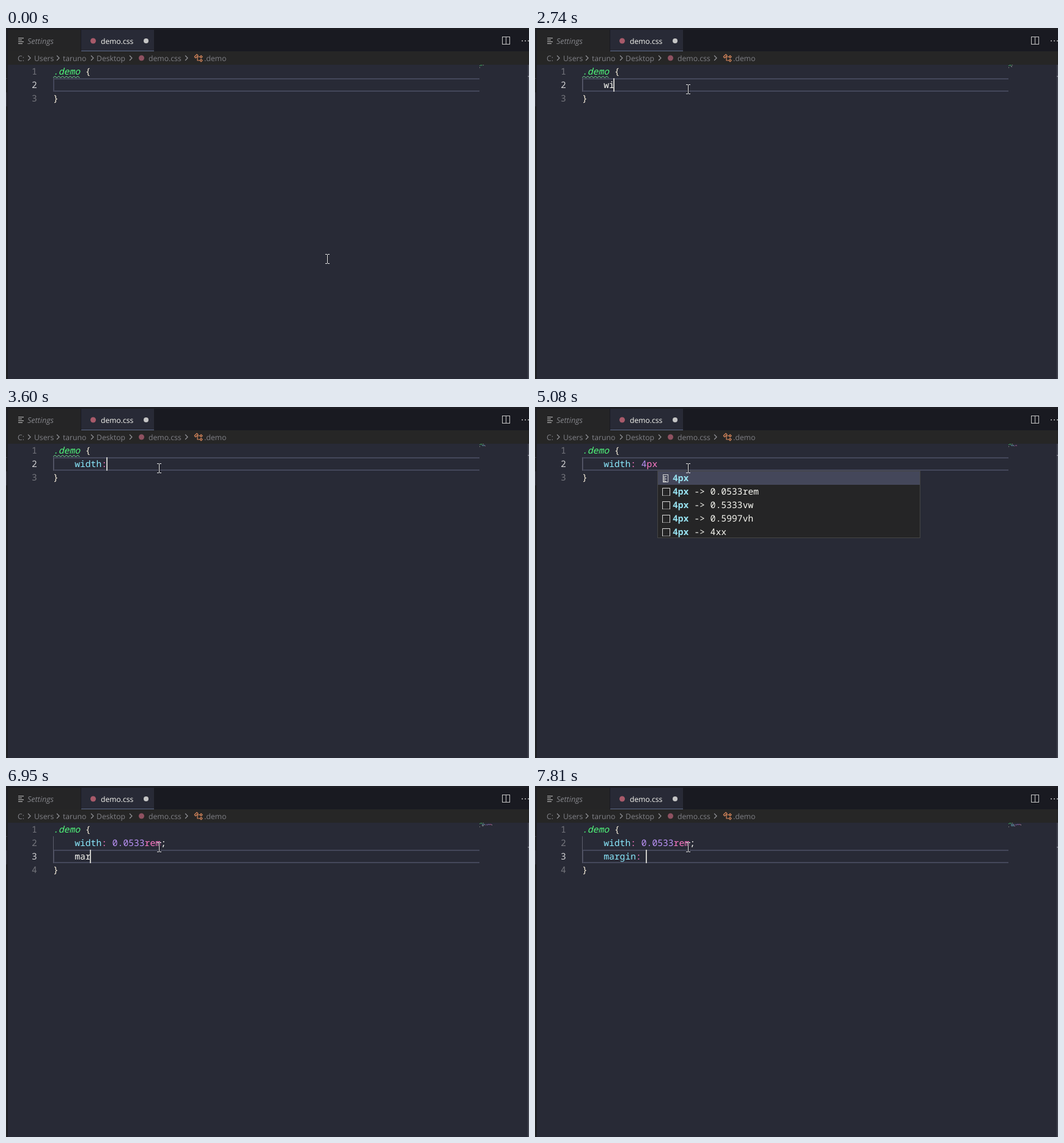
An HTML page with a canvas that plays this animation: 855 by 573 pixels, repeating every 8000 ms.

```html
<!DOCTYPE html>
<html lang="en">
<head>
<meta charset="utf-8">
<title>Editor demo</title>
<style>
html, body { margin: 0; width: 855px; height: 573px; overflow: hidden; background: #282a36; }
canvas { display: block; }
</style>
</head>
<body>
<canvas id="stage" width="855" height="573"></canvas>
<script>
const ctx = document.getElementById('stage').getContext('2d');
const LOOP = 8000, CELL = 8.8, LEFT = 77, ROW = 22;
const MONO = '"Noto Sans Mono", "DejaVu Sans Mono", monospace';
const UI = '"Open Sans", "Noto Sans", sans-serif';
const WHITE = '#f8f8f2', CYAN = '#8be9fd', PINK = '#ff79c6', PURPLE = '#bd93f9', BRACE = '#f8f0dc';

// Start time, line 2, line 3 (null = not there yet), popup, caret shown
const states = [
  [0, '', null, '', 0],
  [1650, '    ', null, '', 1],
  [2260, '    ', null, '', 0],
  [2570, '    w', null, '', 1],
  [2740, '    wi', null, '', 1],
  [2890, '    wid', null, 'width', 1],
  [3130, '    widt', null, 'width', 1],
  [3210, '    width', null, 'width', 1],
  [3600, '    width:', null, '', 1],
  [3690, '    width: ', null, '', 1],
  [3990, '    width: 4', null, '', 1],
  [4240, '    width: 4p', null, 'unit', 1],
  [4450, '    width: 4px', null, 'px', 1],
  [4930, '    width: 4px', null, 'px', 0],
  [5160, '    width: 4px', null, 'pxNext', 0],
  [5310, '    width: 0.0533rem', null, '', 1],
  [5860, '    width: 0.0533rem;', null, '', 1],
  [6240, '    width: 0.0533rem;', '    ', '', 1],
  [6710, '    width: 0.0533rem;', '    m', '', 1],
  [6880, '    width: 0.0533rem;', '    ma', '', 1],
  [6950, '    width: 0.0533rem;', '    mar', '', 1],
  [7030, '    width: 0.0533rem;', '    mar', 'marginList', 1],
  [7110, '    width: 0.0533rem;', '    mar', 'margin', 1],
  [7270, '    width: 0.0533rem;', '    marg', 'margin', 1],
  [7350, '    width: 0.0533rem;', '    margi', 'margin', 1],
  [7430, '    width: 0.0533rem;', '    margin', 'margin', 1],
  [7730, '    width: 0.0533rem;', '    margin:', 'margin', 1],
  [7810, '    width: 0.0533rem;', '    margin: ', '', 1]
];

const pointer = [
  [0, 525, 376], [70, 521, 372], [1110, 470, 305], [1190, 385, 212], [1270, 312, 144],
  [1340, 266, 108], [1420, 250, 99], [1650, 256, 102], [1720, 253, 101], [1800, 250, 99]
];

const marginItems = ['margin', ...['block', 'block-end', 'block-start', 'bottom', 'inline',
  'inline-end', 'inline-start', 'left', 'right', 'top'].map(s => 'margin-' + s), 'scroll-margin'];
const widthItems = ['width', ...['border', 'border-bottom', 'border-left', 'border-right', 'border-top',
  'column', 'column-rule', 'max', 'min', 'outline', 'stroke'].map(s => s + '-width')];
const pxItems = ['4px', '4px -> 0.0533rem', '4px -> 0.5333vw', '4px -> 0.5997vh', '4px -> 4xx'];
const marginDoc = ['Shorthand property to set values the', 'thickness of the margin area. If left is',
  'omitted, it is the same as right. If bottom is', 'omitted it is the same as top, if right is',
  'omitted it is the same as top. Negative', 'values for margin properties are allowed, but',
  'there may be implementation-specific limits.', '', 'Syntax: [ <length> | <percentage> | auto ]', '{1,4}'];
const widthDoc = ['Specifies the width of the content area,', 'padding area or border area (depending on',
  "'box-sizing') of certain boxes.", '', 'Syntax: <viewport-length>{1,2}'];

const popups = {
  width: { items: widthItems, doc: widthDoc, icon: wrench, w: 330 },
  marginList: { items: marginItems, icon: wrench, w: 330 },
  margin: { items: marginItems, doc: marginDoc, icon: wrench, w: 330 },
  unit: { items: ['4pc', '4pt', '4px', '4cap', '4dpi', '4dpcm', '4dppx'], icon: ruler, w: 430 },
  px: { items: pxItems, icon: pxIcon, w: 430 },
  pxNext: { items: pxItems, icon: pxIcon, w: 430, selected: 1 }
};

function at(list, t) {
  return list.findLast(entry => entry[0] <= t);
}

function box(x, y, w, h, color) {
  ctx.fillStyle = color;
  ctx.fillRect(x, y, w, h);
}

function frame(x, y, w, h, fill, border) {
  box(x, y, w, h, border);
  box(x + 1, y + 1, w - 2, h - 2, fill);
}

function line(color, width, ...paths) {
  ctx.strokeStyle = color;
  ctx.lineWidth = width;
  ctx.beginPath();
  for (const p of paths)
    for (let i = 0; i < p.length; i += 2) ctx[i ? 'lineTo' : 'moveTo'](p[i], p[i + 1]);
  ctx.stroke();
}

function dot(x, y, r, color) {
  ctx.fillStyle = color;
  ctx.beginPath();
  ctx.arc(x, y, r, 0, 7);
  ctx.fill();
}

function label(text, x, y, color, size = 12.2, style = '') {
  ctx.font = `${style} ${size}px ${UI}`;
  ctx.fillStyle = color;
  ctx.fillText(text, x, y);
}

// Monospaced text, one glyph per cell; colors holds one entry per character
function grid(text, x, y, colors, style = () => '') {
  [...text].forEach((ch, i) => {
    ctx.font = `${style(i)} 14.66px ${MONO}`;
    ctx.fillStyle = colors[i];
    ctx.fillText(ch, x + i * CELL, y);
  });
}

function colorsOf(text) {
  if (text[0] === '.') return [...text].map((c, i) => i < 5 ? '#50fa7b' : BRACE);
  if (text === '}') return [BRACE];
  const [, pad, name, colon, value] = text.match(/^(\s*)([a-z]*)(:?)(.*)$/);
  const known = /^(width|margin)$/.test(name) ? CYAN : WHITE;
  return [...pad].map(() => WHITE).concat(
    [...name].map(() => known), colon ? [PINK] : [],
    [...value].map(c => /[\d.]/.test(c) ? PURPLE : /[a-z]/.test(c) ? PINK : WHITE));
}

function wrench(x, y) {
  line('#c5c5c5', 1.1, [x + 8, y + 5, x + 2, y + 11, x + 1, y + 13, x + 3, y + 13, x + 9, y + 7],
    [x + 8, y + 5, x + 8, y + 2, x + 11, y, x + 10, y + 3, x + 12, y + 4, x + 14, y + 3, x + 13, y + 6, x + 9, y + 7]);
}

function ruler(x, y) {
  ctx.strokeStyle = '#d0d0d0';
  ctx.lineWidth = 1;
  ctx.strokeRect(x + 2.5, y + .5, 8, 12);
  for (let i = 3; i < 12; i += 2) box(x + 3, y + i, i % 4 === 3 ? 5 : 3, 1, '#d0d0d0');
}

function snippet(x, y) {
  ctx.setLineDash([1, 1]);
  ctx.strokeStyle = '#d8d8d8';
  ctx.lineWidth = 1;
  ctx.strokeRect(x + 1.5, y + .5, 12, 12);
  ctx.setLineDash([]);
  line('#d8d8d8', 1, [x + 1.5, y + 13, x + 1.5, y + .5, x + 13.5, y + .5, x + 13.5, y + 13]);
}

function pxIcon(x, y, i) {
  (i ? snippet : ruler)(x, y);
}

function chrome() {
  box(0, 0, 855, 573, '#282a36');
  box(0, 0, 855, 38, '#191a21');
  box(0, 0, 122, 38, '#252526');
  box(0, 0, 855, 3, '#1e1f25');
  box(123, 3, 119, 35, '#282a36');
  box(123, 37, 119, 1, '#5d6a88');
  box(0, 38, 855, 22, '#262626');
  box(0, 0, 2, 573, '#222326');
  box(2, 3, 1, 570, '#1b1c22');
  box(0, 82, 2, 1, '#3d3e48');
  box(0, 105, 2, 23, '#30313a');
  box(853, 60, 2, 513, '#41434e');

  [9, 6, 9, 7].forEach((w, i) => box(20, 16 + i * 3, w, 1, '#c5c5c5'));
  label('Settings', 35, 26, '#85868b', 12.6, 'italic');
  dot(142.5, 21, 4.5, '#a85a6a');
  label('demo.css', 155, 26, WHITE, 12.1);
  dot(229, 21, 4, '#c5c5c5');
  ctx.strokeStyle = '#c5c5c5';
  ctx.lineWidth = 1;
  ctx.strokeRect(811.5, 14.5, 12, 12);
  box(817, 15, 1, 12, '#c5c5c5');
  for (const x of [844, 849, 854]) dot(x, 21, 1, '#c5c5c5');

  const crumbs = [['C:', 19], ['Users', 46], ['taruno', 93], ['Desktop', 148], ['demo.css', 233], ['.demo', 324]];
  for (const [text, x] of crumbs) label(text, x, 54, '#808187');
  for (const x of [36, 83, 139, 202, 293]) line('#98999e', 1.1, [x, 45, x + 4, 49, x, 53]);
  dot(221.5, 49, 4.5, '#8e5160');
  line('#d9885c', 1.2, [308, 47, 312, 43, 314, 45, 310, 49, 308, 47], [312, 47, 317, 47],
    [313, 47, 313, 53, 317, 53], [317, 47, 319, 45, 321, 47, 319, 49, 317, 47],
    [317, 53, 319, 51, 321, 53, 319, 55, 317, 53]);
}

function editor(lines, active, guides, squiggle) {
  const top = 60 + active * ROW;
  box(LEFT, top, 697, 2, '#44475a');
  box(LEFT, top + 20, 697, 2, '#44475a');
  box(LEFT, top, 2, ROW, '#44475a');
  if (guides) box(LEFT, 82, 1, (lines.length - 2) * ROW, '#5b5d6b');
  box(853, active > 1 ? 99 : 78, 2, 2, '#777883');

  lines.forEach((text, i) => {
    const y = 76 + i * ROW, colors = colorsOf(text);
    grid(String(i + 1), 42, y, [i === active ? '#d0d0d2' : '#74757c'], () => i === active ? '500' : '');
    grid(text, LEFT, y, colors, n => !i && n < 5 ? 'italic' : colors[n] === WHITE ? '500' : '');
    ctx.globalAlpha = .5;
    [...text].forEach((ch, n) => {
      if (ch !== ' ') box(774 + n, 60 + i * 2 + (/[.:;]/.test(ch) ? 1 : n % 2 / 2), 1, 1.2, colors[n]);
    });
    ctx.globalAlpha = 1;
  });
  if (squiggle) {
    const wave = [];
    for (let i = 0; i <= 14; i++) wave.push(LEFT + i * 3.1, i % 2 ? 78.8 : 81.2);
    line('#78d99a', 1, wave);
  }
}

function docPanel(x, y, doc) {
  let base = y + 22;
  const spots = doc.map(text => {
    const spot = [text, base];
    base += text ? ROW : 16;
    return spot;
  });
  base += 16;
  frame(x, y, 330, base + 10 - y, '#252526', '#454545');
  for (const [text, ty] of spots) label(text, x + 6, ty, '#e4e4e4', 15.05);
  label('KLB Reference', x + 6, base, '#4290e0', 15.05);
  line('#8a8a8a', 1, [x + 309, y + 8, x + 317, y + 16], [x + 317, y + 8, x + 309, y + 16]);
}

function popup({ items, doc, icon, w, selected = 0 }, x, y, typed) {
  const h = items.length * ROW;
  frame(x, y, w, h, '#252526', '#454545');
  box(x + 1, y + 1 + selected * ROW, w - 2, ROW, '#44475a');
  items.forEach((text, i) => {
    const top = y + i * ROW, from = text.indexOf(typed);
    const hit = n => from >= 0 && n >= from && n < from + typed.length;
    icon(x + 7, top + 6, i);
    grid(text, x + 25, top + 17, [...text].map((c, n) => hit(n) ? '#97e1ef' : WHITE), n => hit(n) ? 'bold' : '500');
  });
  if (icon === wrench) box(x + w - 11, y + 1, 10, 75, '#4a4a4b');
  if (doc) docPanel(x + w, y, doc);
}

function ibeam(x, y) {
  box(x - 1, y - 6, 3, 13, '#20212a');
  box(x, y - 6, 1, 14, '#e8e8e8');
  for (const dy of [-7, 8]) {
    box(x - 3, y + dy, 3, 1, '#e8e8e8');
    box(x + 1, y + dy, 3, 1, '#e8e8e8');
  }
}

function draw(t) {
  const [, second, third, kind, caret] = at(states, t);
  const active = third === null ? 1 : 2;
  const text = third ?? second;
  const lines = ['.demo {', second, ...(third === null ? [] : [third]), '}'];
  const caretX = LEFT + text.length * CELL, top = 60 + active * ROW;

  chrome();
  editor(lines, active, t >= 2570, t < 5080);
  if (caret) box(Math.floor(caretX) - 1, top, 2, ROW, '#c9c9c6');
  if (kind) popup(popups[kind], Math.floor(caretX), top + ROW, text.match(/(\w+):?$/)[1]);
  const [, x, y] = at(pointer, t);
  ibeam(x, y);
}

ctx.textRendering = 'geometricPrecision';
const start = performance.now();
function tick() {
  draw((performance.now() - start) % LOOP);
  requestAnimationFrame(tick);
}
tick();
</script>
</body>
</html>
```
